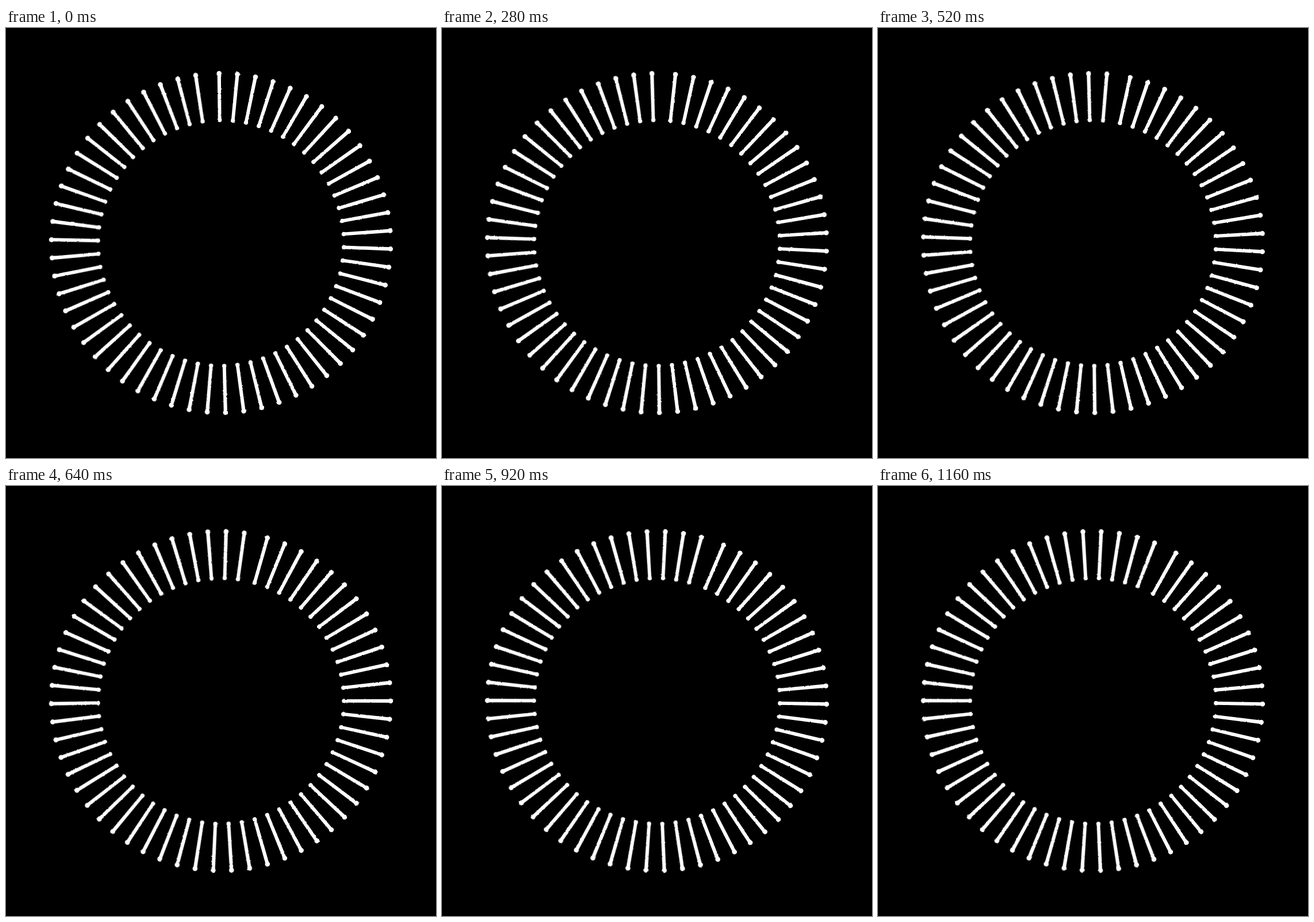
An HTML page that plays this animation: 748 px wide and 748 px high, repeating every 1200 ms.

```html
<!DOCTYPE html>
<html lang="en">
<head>
<meta charset="utf-8">
<title>Rotating ring of strokes</title>
<style>
  html, body { margin: 0; width: 100%; height: 100%; overflow: hidden; background: #000; }
  svg { display: block; width: 100vw; height: 100vh; }
</style>
</head>
<body>
<svg viewBox="0 0 748 748">
  <defs>
    <filter id="rough" filterUnits="userSpaceOnUse" x="0" y="0" width="748" height="748" color-interpolation-filters="sRGB">
      <feTurbulence type="fractalNoise" baseFrequency="0.3" numOctaves="1" seed="4" result="noise"/>
      <feDisplacementMap in="SourceGraphic" in2="noise" scale="2.4" xChannelSelector="R" yChannelSelector="G"/>
    </filter>
  </defs>
  <rect width="748" height="748" fill="#000"/>
  <g filter="url(#rough)">
    <g id="ring" fill="#fff"></g>
  </g>
</svg>
<script>
const LOOP = 1200;
const STEP = 40;
const CENTER = 374;
const BARS = 58;
const PITCH = 6.176; // degrees; the remainder leaves one wider gap
const START = -0.63;
const OUTER = 295;
const INNER = 214;

const ring = document.getElementById('ring');

function add(name, attrs, parent) {
  const node = document.createElementNS('http://www.w3.org/2000/svg', name);
  for (const key in attrs) node.setAttribute(key, attrs[key]);
  parent.appendChild(node);
  return node;
}

function addBar(angle) {
  const bar = add('g', { transform: `rotate(${angle})` }, ring);
  add('path', { d: `M-3.1 ${-OUTER}L3.1 ${-OUTER}L2.9 ${-INNER}L-2.9 ${-INNER}Z` }, bar);
  add('circle', { cy: -OUTER, r: 4.3 }, bar);
  add('circle', { cy: -INNER, r: 3.7 }, bar);
}

for (let i = 0; i < BARS; i++) addBar(i * PITCH);

// Five pitches per loop, with a slight swell in speed.
function angleAt(ms) {
  const p = Math.floor(ms / STEP) * STEP / LOOP;
  const a = 2 * Math.PI * p;
  return START + 5 * PITCH * p - 0.2 * Math.sin(a) - 0.06 * (1 - Math.cos(2 * a));
}

function draw(ms) {
  ring.setAttribute('transform', `translate(${CENTER} ${CENTER}) rotate(${angleAt(ms).toFixed(3)})`);
}

let origin;
function tick(now) {
  if (origin === undefined) origin = now;
  draw((now - origin) % LOOP);
  requestAnimationFrame(tick);
}

draw(0);
requestAnimationFrame(tick);
</script>
</body>
</html>
```
